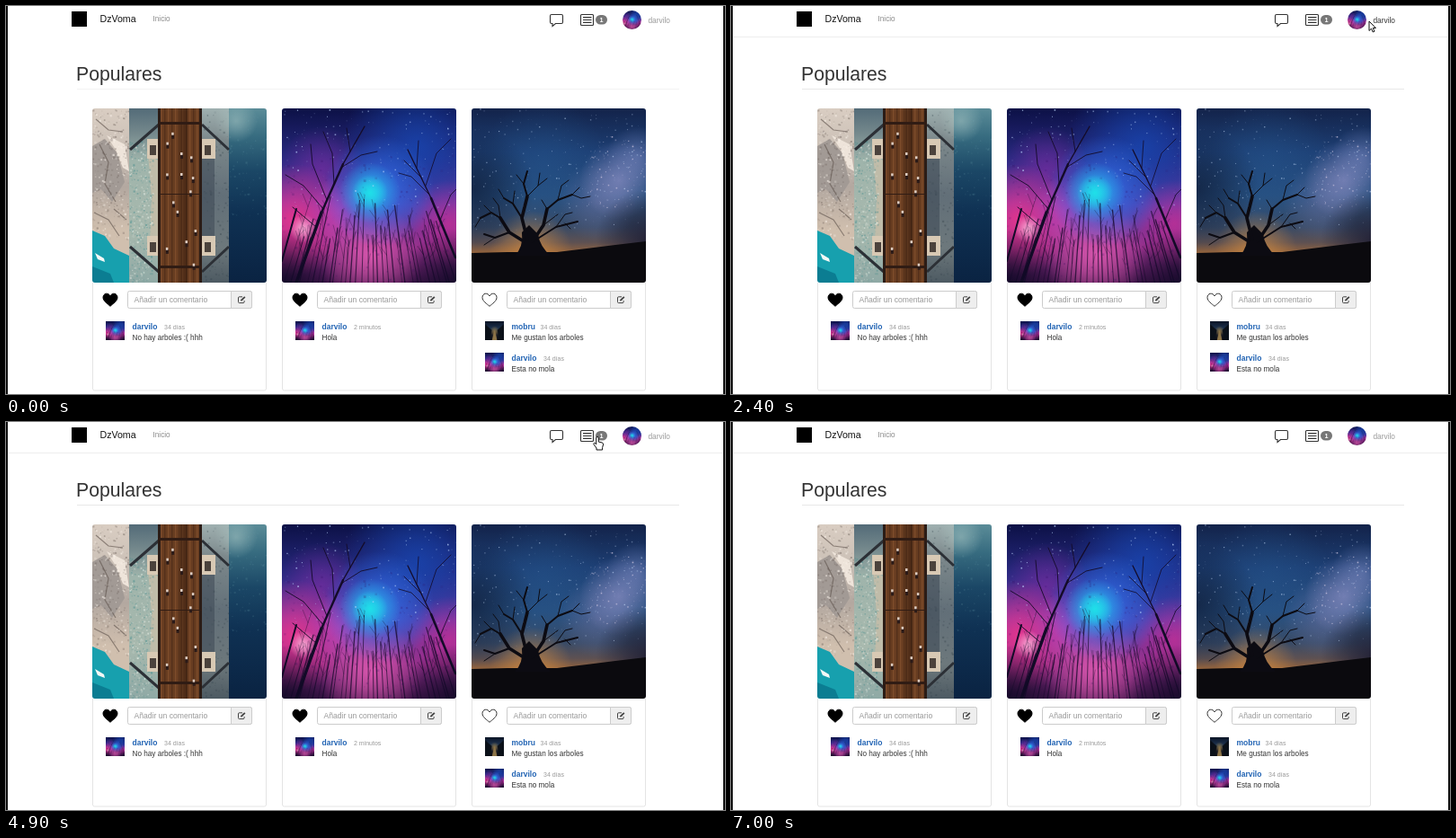
An HTML page with a canvas that plays this animation: 800x432 px, repeating every 7.1 s.

```html
<!DOCTYPE html>
<html lang="es">
<head>
<meta charset="utf-8">
<title>Populares</title>
<style>
  html, body { margin: 0; width: 100%; height: 100%; overflow: hidden; background: #fff; }
  canvas, svg { position: absolute; display: block; }
  svg { left: 0; top: 0; }
  text { font-family: "Liberation Sans", Arial, sans-serif; white-space: pre; }
  .photo { border-radius: 3px; }
  .round { border-radius: 50%; }
</style>
</head>
<body>
<script>
const LOOP = 7100, SIZE = 194;
const USER = 'darvilo', FRIEND = 'mobru';

// ---------- photos ----------
function randomFrom(seed) {
  return () => (seed = (seed * 16807) % 2147483647) / 2147483647;
}

function makePhoto(paint) {
  const canvas = document.createElement('canvas');
  canvas.width = canvas.height = SIZE;
  paint(canvas.getContext('2d'));
  return canvas;
}

function rect(c, color, x, y, w, h) {
  c.fillStyle = color;
  c.fillRect(x, y, w, h);
}

function shape(c, color, path) {
  c.fillStyle = color;
  c.fill(new Path2D(path));
}

function line(c, color, width, path) {
  c.strokeStyle = color;
  c.lineWidth = width;
  c.stroke(new Path2D(path));
}

function fade(c, stops, x = 0, w = SIZE) {
  const g = c.createLinearGradient(0, 0, 0, SIZE);
  stops.forEach(([at, color]) => g.addColorStop(at, color));
  rect(c, g, x, 0, w, SIZE);
}

function glow(c, x, y, r, rgb, alpha) {
  const g = c.createRadialGradient(x, y, 0, x, y, r);
  g.addColorStop(0, `rgba(${rgb},${alpha})`);
  g.addColorStop(0.35, `rgba(${rgb},${alpha * 0.7})`);
  g.addColorStop(1, `rgba(${rgb},0)`);
  rect(c, g, x - r, y - r, 2 * r, 2 * r);
}

function specks(c, rnd, n, x, y, w, h, rgb, alpha, size) {
  for (let i = 0; i < n; i++) {
    const s = size * (0.4 + rnd());
    rect(c, `rgba(${rgb},${alpha * rnd()})`, x + rnd() * w, y + rnd() * h, s, s);
  }
}

function paintBridge(c) {
  const rnd = randomFrom(11);
  // cliff and bay
  fade(c, [[0, '#d9cdc2'], [0.2, '#cdc2b8'], [0.45, '#b3a8a0'], [0.7, '#d0bfae']], 0, 42);
  shape(c, '#a29a95', 'M0 42L14 34 28 50 36 82 22 104 10 90 0 94Z');
  shape(c, '#eee4da', 'M16 30L36 40 41 70 34 66 26 46Z');
  line(c, 'rgba(92,80,74,.6)', 1.2, 'M4 12L18 24 34 26M8 40L18 60 14 84 26 104M24 112L38 124M2 116L18 124 30 142');
  specks(c, rnd, 200, 0, 0, 41, 145, '90,78,72', 0.4, 1.6);
  specks(c, rnd, 140, 0, 0, 41, 145, '255,248,240', 0.6, 1.8);
  shape(c, '#17a0ae', 'M0 136L14 142 24 156 41 164V194H0Z');
  shape(c, '#0b7d92', 'M0 176L20 184 24 194H0Z');
  shape(c, '#f4f8f6', 'M3 161L13 167 14 171 6 168Z');
  // foaming river
  fade(c, [[0, '#536b78'], [0.14, '#74888c'], [0.3, '#9fb4ab'], [0.7, '#a8b9ae'], [1, '#8fa9a5']], 41, 33);
  shape(c, '#c0bca9', 'M62 50L73 58V142L64 150 66 100Z');
  specks(c, rnd, 320, 41, 36, 26, 158, '60,136,138', 0.45, 1.6);
  specks(c, rnd, 220, 41, 36, 26, 158, '232,238,230', 0.6, 1.6);
  // right bank and deep water
  fade(c, [[0, '#9fb0b0'], [0.18, '#7d898c'], [0.5, '#626f78'], [0.8, '#6d787c'], [1, '#4d5a62']], 121, 32);
  shape(c, 'rgba(60,72,84,.55)', 'M122 54L136 46V148L122 142Z');
  specks(c, rnd, 150, 124, 0, 28, 194, '50,64,74', 0.4, 1.6);
  fade(c, [[0, '#5b8c98'], [0.16, '#376c80'], [0.36, '#1b4766'], [0.6, '#0f3153'], [1, '#0a2342']], 152, 42);
  glow(c, 160, 14, 24, '176,204,200', 0.5);
  specks(c, rnd, 110, 152, 0, 42, 120, '110,160,172', 0.25, 1.6);
  // towers
  for (const y of [34, 142]) {
    rect(c, '#d8c9b4', 61, y, 14, 22);
    rect(c, '#d8c9b4', 121, y, 16, 22);
    rect(c, '#4b423c', 64, y + 7, 7, 11);
    rect(c, '#4b423c', 125, y + 7, 7, 11);
  }
  line(c, '#2c3036', 3, 'M42 46L74 18M152 46L122 18M42 154L74 182M152 154L122 182');
  // deck
  rect(c, '#683d21', 74, 0, 48, SIZE);
  for (let x = 76; x < 121; x += 4) rect(c, x % 8 ? '#7d4c2b' : '#54301b', x, 0, 1.4, SIZE);
  rect(c, 'rgba(40,20,12,.4)', 98, 0, 8, SIZE);
  rect(c, '#2b1c16', 73, 0, 3, SIZE);
  rect(c, '#2b1c16', 119, 0, 3, SIZE);
  for (const y of [15, 95, 175]) rect(c, '#301c14', 74, y, 48, y === 95 ? 1 : 3);
  for (let i = 0; i < 14; i++) {
    const x = 80 + rnd() * 36, y = 10 + rnd() * 172;
    rect(c, '#2a1a18', x, y + 2, 3, 5);
    rect(c, '#ddcdc2', x, y, 2.5, 3);
  }
}

function paintForest(c) {
  const rnd = randomFrom(29);
  fade(c, [[0, '#0c1146'], [0.28, '#27287e'], [0.55, '#5f3aa8'], [0.8, '#8c2d86'], [1, '#3c1448']]);
  glow(c, 150, 44, 84, '24,70,176', 0.85);
  glow(c, 44, 68, 48, '120,44,160', 0.7);
  glow(c, 14, 124, 62, '238,52,140', 0.9);
  glow(c, 186, 128, 48, '206,46,150', 0.7);
  glow(c, 64, 116, 40, '216,70,190', 0.6);
  glow(c, 98, 164, 58, '236,96,184', 0.8);
  glow(c, 108, 92, 62, '48,110,232', 0.9);
  glow(c, 98, 94, 34, '40,190,236', 0.9);
  glow(c, 98, 94, 20, '30,228,232', 0.9);
  glow(c, 24, 134, 16, '255,190,225', 0.8);
  specks(c, rnd, 190, 0, 0, SIZE, 110, '190,215,255', 0.75, 1.2);
  specks(c, rnd, 200, 0, 50, SIZE, 144, '50,16,100', 0.25, 2);
  c.lineCap = 'round';
  const ink = '#140b28';
  for (let i = 0; i < 32; i++) {
    const x = i * 6.2 + rnd() * 4, reach = 0.3 + rnd() * 0.35;
    const tx = x + (97 - x) * reach * 0.5, ty = 194 - 150 * reach;
    line(c, 'rgba(24,10,44,.75)', 0.5 + rnd() * 0.9, `M${x} 194L${tx} ${ty}`);
    for (let k = 0; k < 4; k++) {
      const f = 0.4 + rnd() * 0.6, bx = x + (tx - x) * f, by = 194 + (ty - 194) * f;
      line(c, 'rgba(24,10,44,.6)', 0.5, `M${bx} ${by}l${rnd() * 14 - 7} ${-6 - rnd() * 14}`);
    }
  }
  line(c, ink, 3.6, 'M16 194L44 116');
  line(c, ink, 2.4, 'M44 116L68 62');
  line(c, ink, 1.4, 'M68 62L92 20');
  line(c, ink, 0.9, 'M58 84L56 50 46 26M66 66L88 52 106 48M46 112L24 86 4 74M50 102L34 62 32 40M76 48L72 22M38 132L12 110');
  line(c, ink, 2.6, 'M193 166L166 100');
  line(c, ink, 1.3, 'M166 100L140 46');
  line(c, ink, 0.8, 'M160 86L172 50 188 34M176 124L188 96 194 90M164 96L144 76 130 72M150 66L152 36M156 78L136 58');
  line(c, ink, 2, 'M0 170L16 112');
  glow(c, 0, 194, 60, '14,8,36', 0.85);
  glow(c, 194, 194, 60, '14,8,36', 0.8);
}

function paintNight(c) {
  const rnd = randomFrom(53);
  fade(c, [[0, '#13234a'], [0.25, '#1d3f74'], [0.5, '#28507f'], [0.68, '#394b66'], [0.77, '#5e5152'], [0.83, '#95643c']]);
  glow(c, 80, 60, 70, '36,84,140', 0.5);
  glow(c, 140, 104, 44, '112,118,170', 0.5);
  glow(c, 164, 80, 44, '150,150,204', 0.65);
  glow(c, 184, 54, 34, '128,140,196', 0.5);
  glow(c, 66, 160, 46, '226,150,66', 0.65);
  glow(c, 0, 90, 70, '14,28,56', 0.75);
  glow(c, 194, 146, 56, '30,30,52', 0.85);
  specks(c, rnd, 260, 0, 0, SIZE, 135, '205,226,255', 0.6, 1.1);
  specks(c, rnd, 120, 130, 30, 64, 80, '240,225,245', 0.6, 1.2);
  shape(c, '#0b0a0e', 'M0 161L40 160 95 160 128 156 160 152 194 148V194H0Z');
  c.lineCap = c.lineJoin = 'round';
  const ink = '#0c0b12';
  shape(c, ink, 'M48 164Q58 154 56 138L64 130 74 140Q76 154 88 164Z');
  line(c, ink, 3.6, 'M62 146L56 122 62 98M68 148L80 130 84 112M58 148L42 138 32 122');
  line(c, ink, 2, 'M62 98L58 84 62 70M84 112L96 102 112 96M72 146L94 132 118 126M32 122L22 116 10 122M42 138L26 144 14 140M56 122L46 106 36 100');
  line(c, ink, 1, 'M58 84L50 74M62 98L74 86 76 72M74 86L84 78M36 100L30 90M46 106L48 92M96 102L100 86 108 80M112 96L120 88M112 96L122 100 132 98M94 132L104 118 112 116M104 128L110 134M32 122L30 108 24 100M22 116L14 108M10 122L4 132M26 144L14 152M84 112L78 102M80 130L96 118');
}

function paintPath(c) {
  fade(c, [[0, '#0d1526'], [0.4, '#1d3350'], [0.6, '#191d28'], [1, '#0a0c14']]);
  glow(c, 98, 100, 50, '200,160,80', 0.6);
  shape(c, '#8c7448', 'M92 96H104L124 194H72Z');
  shape(c, '#0a1018', 'M0 30L70 90 50 194H0ZM194 30L126 90 146 194H194Z');
}

function place(source, x, y, size, className) {
  const canvas = document.createElement('canvas');
  canvas.width = canvas.height = size;
  canvas.className = className || '';
  canvas.style.left = x + 'px';
  canvas.style.top = y + 'px';
  const c = canvas.getContext('2d');
  c.imageSmoothingQuality = 'high';
  c.drawImage(source, 0, 0, size, size);
  document.body.append(canvas);
}

const bridge = makePhoto(paintBridge), forest = makePhoto(paintForest);
const night = makePhoto(paintNight), path = makePhoto(paintPath);

// ---------- page ----------
const text = (x, y, size, fill, str, extra = '') =>
  `<text x="${x}" y="${y}" font-size="${size}" fill="${fill}" ${extra}>${str}</text>`;
const bold = 'font-weight="bold"';
const box = (x, y, w, h, fill, stroke = 'none', r = 0) =>
  `<rect x="${x}" y="${y}" width="${w}" height="${h}" rx="${r}" fill="${fill}" stroke="${stroke}"/>`;

function comment(x, y, face, name, when, whenX, words) {
  place(face, x + 15, y, 21);
  return text(x + 44.5, y + 9.3, 8.5, '#2264b4', name, bold)
    + text(x + whenX, y + 9.3, 7, '#999', when)
    + text(x + 44.5, y + 21.2, 8.2, '#333', words);
}

function card(x, photo, liked, comments) {
  place(photo, x, 114, SIZE, 'photo');
  return `<path d="M${x + .5} 308V426q0 2 2 2H${x + 191.5}q2 0 2-2V308" fill="none" stroke="#e4e4e4"/>
    <path transform="translate(${x + 20} 327)" d="M0 7.3C-3 4.6-8 1.4-8-2.4C-8-7.4-2-8.4 0-4C2-8.4 8-7.4 8-2.4C8 1.4 3 4.6 0 7.3Z"
      fill="${liked ? '#000' : '#fff'}" stroke="${liked ? '#000' : '#333'}"/>`
    + box(x + 39.5, 317.5, 138, 19, '#fff', '#ccc', 2)
    + `<path d="M${x + 154.5} 317.5H${x + 175.5}q2 0 2 2V334.5q0 2-2 2H${x + 154.5}Z" fill="#eee" stroke="#ccc"/>
    <g transform="translate(${x + 162} 323)" fill="none" stroke="#444">
      <path d="M5 .8H1.6Q.5.8.5 2V6.5Q.5 7.6 1.6 7.6H6Q7.1 7.6 7.1 6.5V5"/>
      <path d="M3.4 5.2L7.8 .8" stroke-width="1.9"/></g>`
    + text(x + 46.5, 329.8, 8.6, '#999', 'Añadir un comentario')
    + comments.map((args, i) => comment(x, 351 + 35.5 * i | 0, ...args)).join('');
}

place(forest, 686, 5, 21, 'round');

const header = box(73, 6, 17, 17, '#000')
  + text(104.5, 18, 10.6, '#111', 'DzVoma')
  + text(163.5, 17.3, 8.2, '#888', 'Inicio')
  + `<rect id="active" x="628" y="0" width="49" height="33" fill="#ebebeb"/>
  <g fill="none" stroke="#333" stroke-width="1.1">
    <path d="M607 9.5H618q1.5 0 1.5 1.5V18q0 1.5-1.5 1.5H611.5L608 22.5V19.5H607q-1.5 0-1.5-1.5V11q0-1.5 1.5-1.5Z"/>
    <rect x="639.5" y="9.5" width="14" height="12" rx="1"/>
    <path d="M642 12.6H651.5M642 15.5H651.5M642 18.4H651.5"/>
  </g>`
  + box(656, 10, 13, 10.5, '#777', 'none', 5.2)
  + text(662.5, 18, 7.3, '#fff', '1', bold + ' text-anchor="middle"')
  + text(714.5, 19, 8.3, '#999', USER, 'id="user"')
  + '<path id="navLine" d="M2 34.5H798" stroke="#eee"/>'
  + text(78, 83, 21.2, '#333', 'Populares')
  + '<path id="titleLine" d="M79 92.5H749" stroke="#e8e8e8"/>';

const days = '34 días';
const cards = card(96, bridge, true, [[forest, USER, days, 80, 'No hay arboles :( hhh']])
  + card(307, forest, true, [[forest, USER, '2 minutos', 80, 'Hola']])
  + card(518, night, false, [
    [path, FRIEND, days, 76.5, 'Me gustan los arboles'],
    [forest, USER, days, 80, 'Esta no mola']]);

const menu = `<g id="menu">
  <rect x="512.5" y="33" width="164" height="67" rx="2" fill="#fff" stroke="#c4c4c4" style="filter:drop-shadow(0 3px 3px rgba(0,0,0,.2))"/>`
  + text(529.5, 44.3, 8.15, '#222', `A <tspan ${bold}>${FRIEND}</tspan> ha comentado en tu imagen`)
  + text(529.5, 65, 8.2, '#222', `"<tspan ${bold}>Barco lila</tspan>" <tspan fill="#777">${days}</tspan>`)
  + '<path d="M513 76.5H676" stroke="#e5e5e5"/>'
  + text(524, 92.3, 8.2, '#333', 'Ver todas las notificaciones') + '</g>';

const pointer = `<g id="pointer" fill="#fff" stroke="#111" stroke-linejoin="round">
  <path id="arrow" d="M0 0V10.5L2.5 8.2 4.2 12 6 11.2 4.3 7.5H7.4Z"/>
  <path id="hand" d="M-1.3 1.3a1.3 1.3 0 0 1 2.6 0V5.6L5 6.4q1.6.4 1.6 2L5.6 12V14.5H-1V12.5L-4.2 8.2q0-1.8 1.7-1.2L-1.3 8.4Z"/></g>`;

document.body.insertAdjacentHTML('beforeend',
  `<svg width="800" height="432" viewBox="0 0 800 432">${header}${cards}${menu}
  ${box(0, 0, 2, 432, '#111')}${box(798, 0, 2, 432, '#111')}${pointer}</svg>`);

// ---------- motion ----------
// time, x, y of the pointer tip; it eases between these rests
const track = [
  [100, 775, 360], [700, 657, 20], [1700, 657, 20],
  [2400, 710, 17], [2800, 718, 17], [3100, 718, 17],
  [3900, 661, 17], [4300, 658, 16.5], [4900, 658, 16.5],
  [5400, 712, 17], [5800, 784, 260], [6200, 794, 432]
];
const ids = {};
document.querySelectorAll('[id]').forEach(el => ids[el.id] = el);
const show = (el, on) => el.setAttribute('visibility', on ? 'visible' : 'hidden');
const within = (t, from, to) => t >= from && t < to;

function pointerAt(t) {
  const i = track.findIndex(key => key[0] > t);
  if (i < 1) return null;
  const [t0, x0, y0] = track[i - 1], [t1, x1, y1] = track[i];
  const f = (t - t0) / (t1 - t0), e = f * f * (3 - 2 * f);
  return [x0 + (x1 - x0) * e, y0 + (y1 - y0) * e];
}

function render(now) {
  const t = Math.floor(now % LOOP / 100) * 100;
  const tip = pointerAt(t);
  const [x, y] = tip || [-50, -50];
  const onList = x > 628 && x < 677 && y < 34;
  const onUser = x > 683 && x < 745 && y < 34;
  const open = within(t, 800, 2000);
  ids.pointer.setAttribute('transform', `translate(${x.toFixed(1)} ${y.toFixed(1)})`);
  show(ids.hand, tip && onList);
  show(ids.arrow, tip && !onList);
  show(ids.menu, open);
  show(ids.active, open);
  show(ids.user, !within(t, 3700, 4100));
  ids.user.setAttribute('fill', onUser ? '#333' : '#999');
  show(ids.navLine, t >= 100);
  ids.titleLine.setAttribute('opacity', t < 100 ? 0.5 : 1);
}

const start = performance.now();
function tick() {
  render(performance.now() - start);
  requestAnimationFrame(tick);
}
tick();
</script>
</body>
</html>
```
